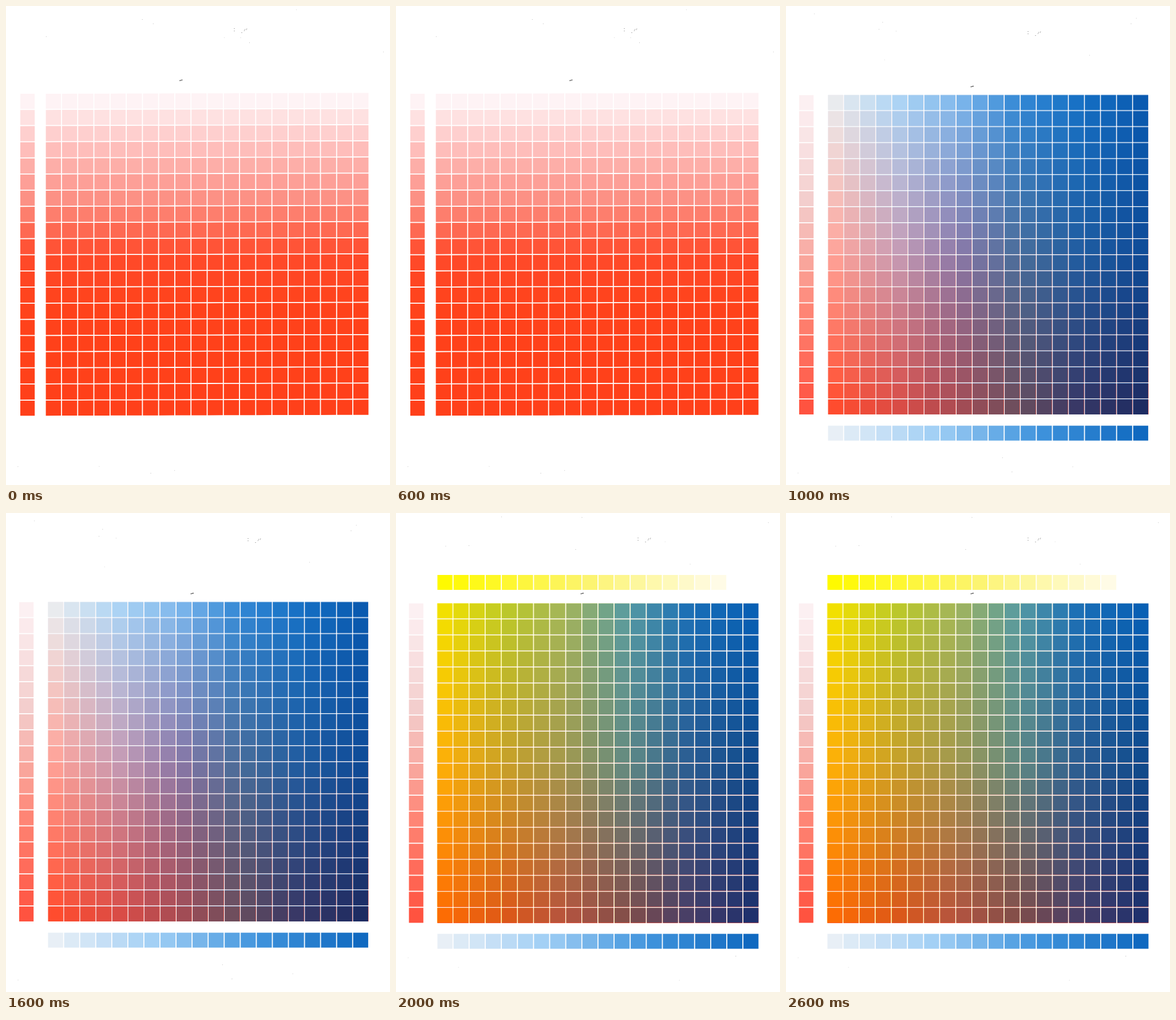
An HTML page for the animation above (3000 ms loop, 671 by 835 pixels).

```html
<!DOCTYPE html>
<html lang="en">
<head>
<meta charset="utf-8">
<title>Ink chart</title>
<style>
html, body { margin: 0; width: 100%; height: 100%; overflow: hidden; background: #fff; }
svg { display: block; width: 671px; height: 835px; }
</style>
</head>
<body>
<svg id="stage" viewBox="0 0 671 835"></svg>
<script>
const NS = 'http://www.w3.org/2000/svg';
const stage = document.getElementById('stage');
const N = 20, HOLD = 1000, GAP = 1.8, FRINGE = 0.6;

// Ink ramps: evenly spaced colours from the first cell to the last.
const scarlet = ramp('fef3f5 febab7 fc8c7f ff4a2a ff421b ff411a ff401a');
const red = ramp('fcf0f2 f3cccb fe8878 ff5340');
const blue = ramp('e8eff6 9fcef5 3f93dc 1069c0');
const yellow = ramp('fffa00 fcf46a fffbe6', 18);

const charts = [
  {
    x: 69.6, y: 153.1, dx: 28.28, dy: 28.15, tilt: -0.0027,
    side: scarlet, sideX: 25,
    field: (r, c) => scarlet(r),
    mark: [397, 38], dash: [303, 129.6]
  },
  {
    x: 73.5, y: 155.4, dx: 28.06, dy: 27.92, tilt: 0,
    side: red, sideX: 23, bottomY: 731.6,
    rowFringe: [FRINGE, 0], colInk: blue, colFringe: [0, -FRINGE],
    field: blend(
      'e9ebee aed4f4 80b8ec 3488d5 1670c4 0a5ab0',
      'fea298 c89cb4 8c78a8 486d9a 205ca0 104c98',
      'ff4c2e dc4c45 a84c54 684e5e 363766 1e2c62'),
    mark: [421, 43], dash: [322.5, 140.4]
  },
  {
    x: 72.4, y: 157.6, dx: 28.14, dy: 27.93, tilt: 0,
    side: red, sideX: 22.6, bottomY: 733.6, topY: 108,
    rowFringe: [0, FRINGE], colInk: yellow, colFringe: [-FRINGE, 0],
    field: blend(
      'f2e000 bcc828 a2b45c 569aa2 1a6eb6 0860b4',
      'fcae08 c8a028 a09850 608a84 2a5c92 114b8c',
      'fc6c04 dc5818 b25440 804e4a 463e68 20306c'),
    mark: [421, 42], dash: [322.5, 140.4]
  }
];

function mix(a, b, t) {
  return a.map((v, i) => v + (b[i] - v) * t);
}

// Linear interpolation along evenly spaced samples, u from 0 to 1.
function along(list, u) {
  const p = Math.min(u, 1) * (list.length - 1);
  const i = Math.min(Math.floor(p), list.length - 2);
  return mix(list[i], list[i + 1], p - i);
}

function ramp(text, count = N) {
  const colours = text.split(' ').map(hex => [0, 2, 4].map(i => parseInt(hex.slice(i, i + 2), 16)));
  return k => along(colours, k / (count - 1));
}

function blend(...texts) {
  const rows = texts.map(text => ramp(text));
  return (r, c) => along(rows.map(row => row(c)), r / (N - 1));
}

function make(tag, attrs, parent) {
  const el = document.createElementNS(NS, tag);
  for (const k in attrs) el.setAttribute(k, attrs[k]);
  return parent.appendChild(el);
}

function box(g, x, y, width, height, colour) {
  make('rect', { x, y, width, height, fill: `rgb(${colour.map(Math.round).join(',')})` }, g);
}

function random(seed) {
  return () => (seed = seed * 16807 % 2147483647) / 2147483647;
}

// Scanner dust: one smudge, one dash and some pale specks in the margins.
function dust(g, { mark, dash }, seed) {
  const stroke = (d, [x, y], colour, width) => make('path',
    { d, transform: `translate(${x} ${y})`, stroke: colour, 'stroke-width': width, fill: 'none' }, g);
  stroke('M1 1.5h2M1 5.5h2M14 8.5h2M21 2l-2 4M24 1l-1 3', mark, '#b4b4b4', 1);
  stroke('M0 0.6L5.5 -0.8', dash, '#777', 1.6);

  const rnd = random(seed);
  for (let i = 0; i < 12; i++) {
    const x = 20 + rnd() * 640, v = 170 + rnd() * 50;
    const y = i % 3 ? rnd() * 100 : 770 + rnd() * 50;
    box(g, x, y, 1, 1, [v, v, v]);
  }
}

function build(chart, index) {
  const { x, y, dx, dy, side, field, colInk, rowFringe, colFringe } = chart;
  const w = dx - GAP, h = dy - GAP;
  const sheet = make('g', { visibility: 'hidden' }, stage);
  const g = make('g', { transform: `matrix(1 ${chart.tilt} 0 1 0 ${-chart.tilt * chart.sideX})` }, sheet);

  const eachCell = fn => {
    for (let r = 0; r < N; r++)
      for (let c = 0; c < N; c++) fn(x + c * dx, y + r * dy, r, c);
  };
  const strip = (ink, top, count) => {
    for (let c = 0; c < count; c++) box(g, x + c * dx, top, w, 26, ink(c));
  };

  // Single inks printed slightly out of register peek out behind the cells.
  if (colInk) eachCell((cx, cy, r, c) => {
    box(g, cx + colFringe[0], cy + colFringe[1], w, h, colInk(c));
    box(g, cx + rowFringe[0], cy + rowFringe[1], w, h, side(r));
  });
  eachCell((cx, cy, r, c) => box(g, cx, cy, w, h, field(r, c)));

  for (let r = 0; r < N; r++) box(g, chart.sideX, y + r * dy, 25.2, h, side(r));
  if (chart.bottomY) strip(blue, chart.bottomY, N);
  if (chart.topY) strip(yellow, chart.topY, 18);

  dust(sheet, chart, 71 + index * 40);
  return sheet;
}

const sheets = charts.map(build);

function draw(ms) {
  const now = Math.floor(ms / HOLD) % sheets.length;
  sheets.forEach((g, i) => g.setAttribute('visibility', i === now ? 'visible' : 'hidden'));
}

const start = performance.now();
function tick() {
  draw(performance.now() - start);
  requestAnimationFrame(tick);
}
tick();
</script>
</body>
</html>
```
